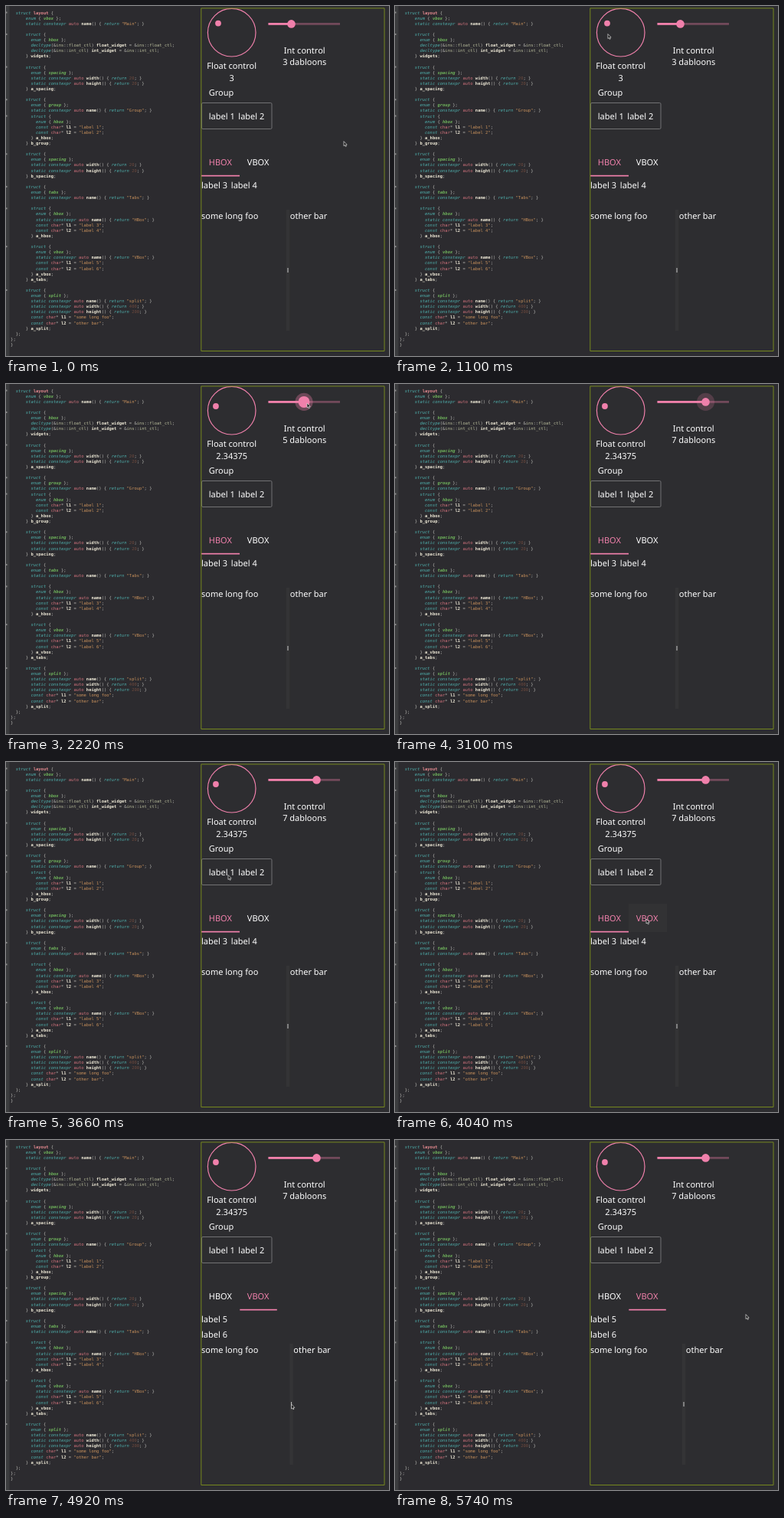
Write an HTML page with a canvas that moves like this. It is 500 px wide and 457 px high and loops after 6240 ms.

```html
<!DOCTYPE html>
<html>
<head>
<meta charset="utf-8">
<style>
html, body { margin: 0; width: 100%; height: 100%; overflow: hidden; background: #2d2d30; }
canvas { display: block; }
</style>
</head>
<body>
<canvas id="stage" width="500" height="457"></canvas>
<script>
const LOOP = 6240, PINK = '#f080ab', WHITE = '#fff', BACK = '#2d2d30';
const stage = document.getElementById('stage');
const codeLayer = document.createElement('canvas');
codeLayer.width = 254;
codeLayer.height = 457;
let ctx;

const code = `  struct layout {
      enum { vbox };
      static constexpr auto name() { return "Main"; }

      struct {
        enum { hbox };
        decltype(&ins::float_ctl) float_widget = &ins::float_ctl;
        decltype(&ins::int_ctl) int_widget = &ins::int_ctl;
        } widgets;

      struct {
        enum { spacing };
        static constexpr auto width() { return 20; }
        static constexpr auto height() { return 20; }
      } a_spacing;

      struct {
        enum { group };
        static constexpr auto name() { return "Group"; }
        struct {
          enum { hbox };
          const char* l1 = "label 1";
          const char* l2 = "label 2";
        } a_hbox;
      } b_group;

      struct {
        enum { spacing };
        static constexpr auto width() { return 20; }
        static constexpr auto height() { return 20; }
      } b_spacing;

      struct {
        enum { tabs };
        static constexpr auto name() { return "Tabs"; }

        struct {
          enum { hbox };
          static constexpr auto name() { return "HBox"; }
          const char* l1 = "label 3";
          const char* l2 = "label 4";
        } a_hbox;

        struct {
          enum { vbox };
          static constexpr auto name() { return "VBox"; }
          const char* l1 = "label 5";
          const char* l2 = "label 6";
        } a_vbox;
      } a_tabs;

      struct {
        enum { split };
        static constexpr auto name() { return "split"; }
        static constexpr auto width() { return 400; }
        static constexpr auto height() { return 200; }
        const char* l1 = "some long foo";
        const char* l2 = "other bar";
      } a_split;
  };
};
}`.replace('  } widgets', '} widgets');

// First matching rule gives a token its colour and font style.
const rules = [
  [/^"/, '#c8915c', ''],
  [/^\d/, '#6f4a3e', ''],
  [/^(struct|enum|static|constexpr|const|decltype|return)$/, '#4fb0ad', 'italic'],
  [/^(auto|char)$/, '#d0727c', ''],
  [/^layout$/, '#e58a90', 'bold'],
  [/^(vbox|hbox|spacing|group|tabs|split)$/, '#6fb45c', 'italic bold'],
  [/^(ins|float_ctl|int_ctl)$/, '#b9bd9c', ''],
  [/^\w/, '#ebe6d4', 'bold'],
  [/./, '#b8b8b4', '']
];

function drawCode() {
  ctx = codeLayer.getContext('2d');
  ctx.textRendering = 'geometricPrecision';
  rect(0, 0, 254, 457, '#2c2b2f');
  rect(0, 0, 4.5, 457, '#3b3c3e');
  const font = '5.48px "DejaVu Sans Mono", monospace';
  ctx.font = font;
  const advance = ctx.measureText('m'.repeat(100)).width / 100;
  code.split('\n').forEach((line, row) => {
    const y = 10.5 + row * 7.107;
    if (line.includes('struct')) rect(0, y - 3, 1.5, 2, '#8d8d8d');
    for (const { 0: token, index } of line.matchAll(/"[^"]*"|\w+|[^\s\w"]/g)) {
      const [, color, style] = rules.find(([test]) => test.test(token));
      ctx.font = `${style} ${font}`;
      ctx.fillStyle = color;
      ctx.fillText(token, 6.1 + index * advance, y);
    }
  });
}

function rect(x, y, w, h, color) {
  ctx.fillStyle = color;
  ctx.fillRect(x, y, w, h);
}

function outline(x, y, w, h, radius, color) {
  ctx.strokeStyle = color;
  ctx.lineWidth = 1;
  ctx.beginPath();
  ctx.roundRect(x, y, w, h, radius);
  ctx.stroke();
}

function disc(x, y, r, color) {
  ctx.fillStyle = color;
  ctx.beginPath();
  ctx.arc(x, y, r, 0, 2 * Math.PI);
  ctx.fill();
}

function text(string, x, y, color = WHITE, align = 'left') {
  ctx.fillStyle = color;
  ctx.textAlign = align;
  ctx.fillText(string, x, y);
}

const progress = (t, from, to) => Math.min(1, Math.max(0, (t - from) / (to - from)));
const ease = p => p * p * (3 - 2 * p);

// Pointer stops: time, x, y
const path = [
  [60, 441, 176.7], [1060, 278, 37.7], [1300, 277, 23], [1380, 277, 23], [1700, 274, 30],
  [2000, 373, 24], [2120, 380, 24], [2220, 393, 25], [2480, 406, 25], [2600, 406, 26],
  [3080, 309, 147.5], [3300, 309, 147.5], [3640, 290, 147.5], [3700, 290, 147.5],
  [4000, 328, 205], [4120, 328, 205], [4340, 293, 207.5], [4420, 293, 207.5],
  [4740, 368, 345], [4820, 368, 345], [5020, 377, 345], [5060, 377, 345], [5320, 458, 227.7]
];

function pointerAt(t) {
  const next = path.findIndex(stop => stop[0] > t);
  if (next === 0) return path[0].slice(1);
  if (next < 0) return path[path.length - 1].slice(1);
  const [t0, x0, y0] = path[next - 1], [t1, x1, y1] = path[next];
  const p = ease((t - t0) / (t1 - t0));
  return [x0 + (x1 - x0) * p, y0 + (y1 - y0) * p];
}

function drawPointer(x, y) {
  ctx.beginPath();
  [[0, 0], [0, 6], [1.4, 4.8], [2.4, 6.9], [3.3, 6.4], [2.5, 4.5], [4.2, 4.4]]
    .forEach(([dx, dy]) => ctx.lineTo(x + dx, y + dy));
  ctx.closePath();
  ctx.fillStyle = '#111';
  ctx.fill();
  ctx.strokeStyle = '#d0d0d0';
  ctx.lineWidth = 0.8;
  ctx.stroke();
}

function drawDial(t) {
  const value = Math.round((3 - 0.65625 * ease(progress(t, 1380, 1700))) * 64) / 64;
  const angle = (196 + (value - 2.34375) * 28.6) * Math.PI / 180;
  ctx.strokeStyle = PINK;
  ctx.lineWidth = 1.2;
  ctx.beginPath();
  ctx.arc(294.7, 34.7, 31.3, 0, 2 * Math.PI);
  ctx.stroke();
  disc(294.9 + 21.8 * Math.cos(angle), 35 + 21.8 * Math.sin(angle), 3.9, PINK);
  text('Float control', 294.7, 82, WHITE, 'center');
  text(value, 294.7, 97.7, WHITE, 'center');
}

function drawSlider(t, pointerX) {
  const dragging = t >= 2040 && t < 2560;
  const position = t < 2040 ? 3 : dragging ? Math.round((pointerX - 347.75) / 8.25) : 7;
  const value = Math.min(7, Math.max(3, position));
  const x = 347.75 + value * 8.25;
  const halo = progress(t, 1960, 2080) * (1 - progress(t, 3160, 3340));
  const press = progress(t, 2040, 2120) * (1 - progress(t, 2560, 2660));
  rect(342.5, 22, 93.5, 2.8, '#71495a');
  rect(342.5, 22, x - 342.5, 2.8, PINK);
  if (halo) disc(x, 23.4, 11.6 * halo, `rgba(240,128,171,${0.2 + 0.13 * press})`);
  disc(x, 23.4, 5.3 + 2.2 * press, PINK);
  text('Int control', 389.7, 61.8, WHITE, 'center');
  text(value + ' dabloons', 389.7, 77.4, WHITE, 'center');
}

function drawTabs(t, x, y) {
  const second = t >= 4080;
  const slide = ease(progress(t, 4080, 4260));
  const hover = left => x > left && x < left + 50 && y > 185 && y < 222;
  ['HBOX', 'VBOX'].forEach((name, i) => {
    const left = 255 + 50 * i, over = hover(left);
    if (over) rect(left, 185, 50, 37, '#323234');
    text(name, left + 9.8, 207.7, over || second === !!i ? PINK : WHITE);
  });
  rect(255 + 50.3 * slide, 220.8, 50 - 1.5 * slide, 1.7, PINK);
  if (second) {
    text('label 5', 255, 238.3);
    text('label 6', 255, 258);
  } else {
    text('label 3', 255, 238.3);
    text('label 4', 293.8, 238.3);
  }
}

function drawSplit(t) {
  const x = 368 + 9 * ease(progress(t, 4820, 5020));
  rect(x - 2.2, 266, 4.4, 158, '#343436');
  rect(x - 0.5, 342, 1, 6, '#c9c9c9');
  text('some long foo', 255, 277.6);
  text('other bar', x + 2.8, 277.6);
}

function draw(now) {
  const t = now % LOOP;
  const [x, y] = pointerAt(t);
  rect(0, 0, 500, 457, BACK);
  ctx.drawImage(codeLayer, 0, 0);
  ctx.font = '11px "Noto Sans", sans-serif';
  drawDial(t);
  drawSlider(t, x);
  text('Group', 264.7, 117.4);
  outline(255.5, 126.5, 91.5, 34, 1.5, '#727274');
  text('label 1', 264.7, 147.6);
  text('label 2', 303.3, 147.6);
  drawTabs(t, x, y);
  drawSplit(t);
  outline(254.8, 2.9, 239.2, 447.6, 0, '#76881f');
  drawPointer(x, y);
  requestAnimationFrame(draw);
}

drawCode();
ctx = stage.getContext('2d');
ctx.textRendering = 'geometricPrecision';
requestAnimationFrame(draw);
</script>
</body>
</html>
```
